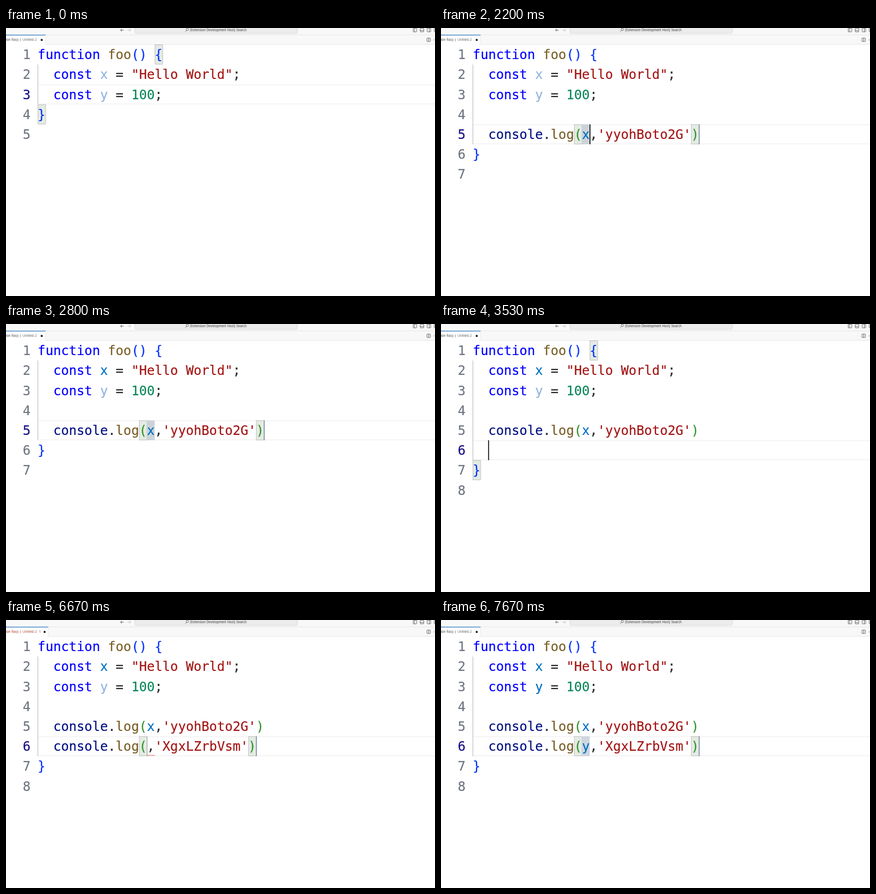
An HTML page for the animation above (8 s loop, 800x500 px).

```html
<!DOCTYPE html>
<html lang="en">
<head>
<meta charset="utf-8">
<title>Editor</title>
<style>
  html, body { margin: 0; width: 100%; height: 100%; overflow: hidden; background: #fff; }
  svg { display: block; width: 800px; height: 500px; }
  text { white-space: pre; }
  .ui { font-family: Inter, "Liberation Sans", sans-serif; }
  .code { font: 24.16px "DejaVu Sans Mono", monospace; }
</style>
</head>
<body>
<svg viewBox="0 0 800 500" xmlns="http://www.w3.org/2000/svg">
  <defs>
    <clipPath id="listClip"><rect x="277" y="217" width="225" height="163"/></clipPath>
  </defs>
  <rect width="800" height="500" fill="#fff"/>
  <rect width="800" height="31" fill="#f8f8f8"/>
  <path d="M0 12.8H800M0 30.6H800" stroke="#e5e5e5"/>
  <rect x="240.4" y="-6" width="303" height="16" rx="3" fill="#ececec" stroke="#d3d3d3" stroke-width=".8"/>
  <g fill="none" stroke-width=".8">
    <path d="M219.5 4H213.5M216 1.5L213.5 4L216 6.5" stroke="#3b3b3b"/>
    <path d="M226.5 4H232.5M230 1.5L232.5 4L230 6.5" stroke="#b5b5b5"/>
    <path d="M334.3 6.8L336.6 4.3" stroke="#555"/>
    <circle cx="338.2" cy="2.7" r="2.2" stroke="#555"/>
    <g stroke="#4a4a4a">
      <rect x="759.4" y=".4" width="6.6" height="6.8" rx=".8"/><path d="M761.8 .4V7.2"/>
      <rect x="772.4" y=".4" width="6.6" height="6.8" rx=".8"/><path d="M772.4 4.8H779"/>
      <rect x="785.4" y=".4" width="6.6" height="6.8" rx=".8"/><path d="M789.4 .4V7.2"/>
      <rect x="798.6" y=".4" width="6.6" height="6.8" rx=".8"/>
      <rect x="785" y="18.8" width="6.4" height="6.4" rx=".8"/><path d="M788.2 18.8V25.2"/>
    </g>
  </g>
  <circle cx="798.3" cy="22.2" r=".6" fill="#4a4a4a"/>
  <text class="ui" x="343" y="6.1" font-size="5.9" fill="#333">[Extension Development Host] Search</text>
  <g id="scene"></g>
</svg>
<script>
const DURATION = 8000;
const LEFT = 59.1, TOP = 30.9, CHAR = 14.546, ROW = 37.2, BASELINE = 27.3;
const BLUE = '#0000ff', BROWN = '#795e26', RED = '#a31515', DARK = '#2b2b2b';
const BRACE = '#0431fa', PAREN = '#319331', CONST = '#0070c1', UNUSED = '#8fb4e0';
const CURSOR_ON = [[70, 600], [800, 1470], [1800, 2700], [3000, 4000],
  [4530, 5670], [6130, 6670], [7130, 7670]];

const scene = document.getElementById('scene');
const within = (t, from, to) => t >= from && t < to;
const colX = col => LEFT + col * CHAR;
const rowY = row => TOP + (row - 1) * ROW;

const rect = (x, y, w, h, fill, extra = '') =>
  `<rect x="${x}" y="${y}" width="${w}" height="${h}" fill="${fill}" ${extra}/>`;
const mono = (x, y, str, fill) =>
  `<text class="code" x="${x}" y="${y}" fill="${fill}" stroke="${fill}" stroke-width=".2">${str}</text>`;
const ui = (x, y, size, str, fill, anchor = 'start') =>
  `<text class="ui" x="${x}" y="${y}" font-size="${size}" fill="${fill}" text-anchor="${anchor}">${str}</text>`;

// Lays out [text, colour] tokens on the character grid.
function codeLine(row, col, tokens) {
  return tokens.map(([str, fill]) => {
    const out = mono(colX(col), rowY(row) + BASELINE, str, fill);
    col += str.length;
    return out;
  }).join('');
}

const logLine = (row, arg, tag) => codeLine(row, 2, [
  ['console', '#001080'], ['.', DARK], ['log', BROWN], ['(', PAREN],
  [arg, CONST], [',', DARK], [`'${tag}'`, RED], [')', PAREN]]);

const bracketBox = (row, col) => rect(colX(col) + .5, rowY(row) + .5, CHAR - .2, ROW - 1,
  '#e4ebe3', 'stroke="#b9b9b9" stroke-width=".9"');

function squiggle(row, col) {
  let d = `M${colX(col)} ${rowY(row) + 35.6}q.9 -1.8 1.8 0`;
  for (let i = 0; i < 7; i++) d += 't1.8 0';
  return `<path d="${d}" fill="none" stroke="#e51400" stroke-width=".8"/>`;
}

function tab(error) {
  const width = error ? 79 : 74;
  const name = error ? '#a1260d' : '#3b3b3b';
  return rect(0, 13, width, 18, '#fff') +
    rect(0, 12.7, width, 1, '#005fb8') + rect(width - .6, 13, .8, 17.5, '#e5e5e5') +
    ui(28, 24.2, 6, 'function foo() {', name, 'end') +
    ui(31, 24.2, 5.6, 'Untitled-2', error ? '#b0452f' : '#616161') +
    (error ? ui(62, 24.2, 5.6, '1', '#b0452f') : '') +
    `<circle cx="${error ? 72 : 66.6}" cy="22.2" r="2" fill="#222"/>`;
}

function suggestions(items, letter) {
  let out = rect(277, 217, 225, 163, '#f8f8f8') + rect(278, 218, 219, 36.6, '#e3e3e3');
  items.forEach((item, i) => {
    const base = 218 + i * ROW + BASELINE;
    const at = item.toLowerCase().indexOf(letter);
    const parts = [[item.slice(0, at), DARK], [item[at], '#0060b8'], [item.slice(at + 1), '#3b3b3b']];
    let x = 288.7;
    out += ui(279, base - 6.3, 5.6, '[ø]', i ? '#3a86c8' : '#222');
    for (const [str, fill] of parts) {
      if (!str) continue;
      const bold = fill === '#0060b8' ? ' font-weight="bold"' : '';
      out += `<g${bold ? ' style="font-weight:bold"' : ''}>` +
        mono(x, base, str, fill).replace('class="code"', `class="code"${bold && ' style="font-weight:bold"'}`) + '</g>';
      x += str.length * CHAR;
    }
  });
  return `<g clip-path="url(#listClip)">${out}</g>` +
    rect(496.8, 218, 4.8, 47, '#b8b8b8') +
    rect(277.5, 217.5, 224, 162.3, 'none', 'stroke="#c8c8c8" stroke-width=".9"');
}

function details(lines) {
  const height = lines.length * ROW + 9;
  return rect(502.2, 217.5, 166.3, height, '#f8f8f8', 'stroke="#d0d0d0" stroke-width=".9"') +
    lines.map((s, i) => mono(504.6, 247 + i * ROW, s, '#616161')).join('') +
    '<path d="M647.4 222.4l3.4 3.4m0 -3.4l-3.4 3.4" stroke="#555" stroke-width=".7"/>';
}

function render(t) {
  const blank = t < 800 ? 0 : t < 930 ? 1 : t < 3530 ? 2 : 3;
  const closeRow = 4 + blank;
  const row = 3 + blank;
  const logX = t >= 1800, logY = t >= 5000;
  const argX = t >= 2200 ? 'x' : '', argY = t >= 7130 ? 'y' : '';
  const snippet = within(t, 1800, 3000) || logY;
  const arg = logY ? argY : argX;
  const outer = t < 1870 || within(t, 3530, 5070);
  const error = within(t, 2330, 2730) || within(t, 5530, 7600);

  let col = 2;
  if (row === 3) col = 16;
  else if (snippet) col = 14 + arg.length;
  else if (within(t, 3000, 3530)) col = 29;

  let out = tab(error);

  // Current line, indent guide and highlights
  out += rect(60, rowY(row) + .4, 740, 1, '#eaeaea') + rect(60, rowY(row) + ROW - 1.2, 740, 1, '#eaeaea');
  out += rect(59, rowY(2), 1, (closeRow - 2) * ROW, '#b4b4b4');
  out += outer
    ? bracketBox(1, 15) + bracketBox(closeRow, 0)
    : bracketBox(row, 13) + bracketBox(row, 27 + arg.length);
  if (snippet) {
    out += rect(colX(14), rowY(row), arg ? CHAR : 1.2, ROW,
      !arg ? 'rgba(10,50,100,.2)' : logY ? '#ced6e0' : '#cbd3d8');
    out += rect(colX(28 + arg.length), rowY(row), 1.2, ROW, 'rgba(10,50,100,.6)');
  }

  for (let n = 1; n <= closeRow + 1; n++)
    out += mono(31.3, rowY(n) + BASELINE, n, n === row ? '#171184' : '#6e7681');

  out += codeLine(1, 0, [['function', BLUE], [' ', DARK], ['foo', BROWN], ['()', BRACE], [' ', DARK], ['{', BRACE]]);
  out += codeLine(2, 2, [['const ', BLUE], ['x', t >= 2670 ? CONST : UNUSED], [' = ', DARK],
    ['"Hello World"', RED], [';', DARK]]);
  out += codeLine(3, 2, [['const ', BLUE], ['y', t >= 7600 ? CONST : UNUSED], [' = ', DARK],
    ['100', '#098658'], [';', DARK]]);
  if (logX) out += logLine(5, argX, 'yyohBoto2G');
  if (logY) out += logLine(6, argY, 'XgxLZrbVsm');
  out += codeLine(closeRow, 0, [['}', BRACE]]);

  if (error) out += squiggle(row, 14 + arg.length);
  if (CURSOR_ON.some(([from, to]) => within(t, from, to)))
    out += rect(colX(col) - .3, rowY(row), 1.6, ROW, '#000');

  if (within(t, 2270, 2600)) {
    const long = 'XMLHttpReque…';
    out += suggestions(['x', 'XMLDocument', long, long, long], 'x');
    if (t >= 2330) out += details(['const x:', '"Hello Wor', 'ld"']);
  }
  if (within(t, 7200, 7530)) {
    out += `<g transform="translate(0 ${ROW})">` +
      suggestions(['y', 'yield', 'Symbol', 'SyntaxError', 'TypeError'], 'y') +
      (t >= 7270 ? details(['const y:', '100']) : '') + '</g>';
  }
  return out;
}

let shown = '';
function frame() {
  const markup = render(performance.now() % DURATION);
  if (markup !== shown) scene.innerHTML = shown = markup;
  requestAnimationFrame(frame);
}
frame();
</script>
</body>
</html>
```
